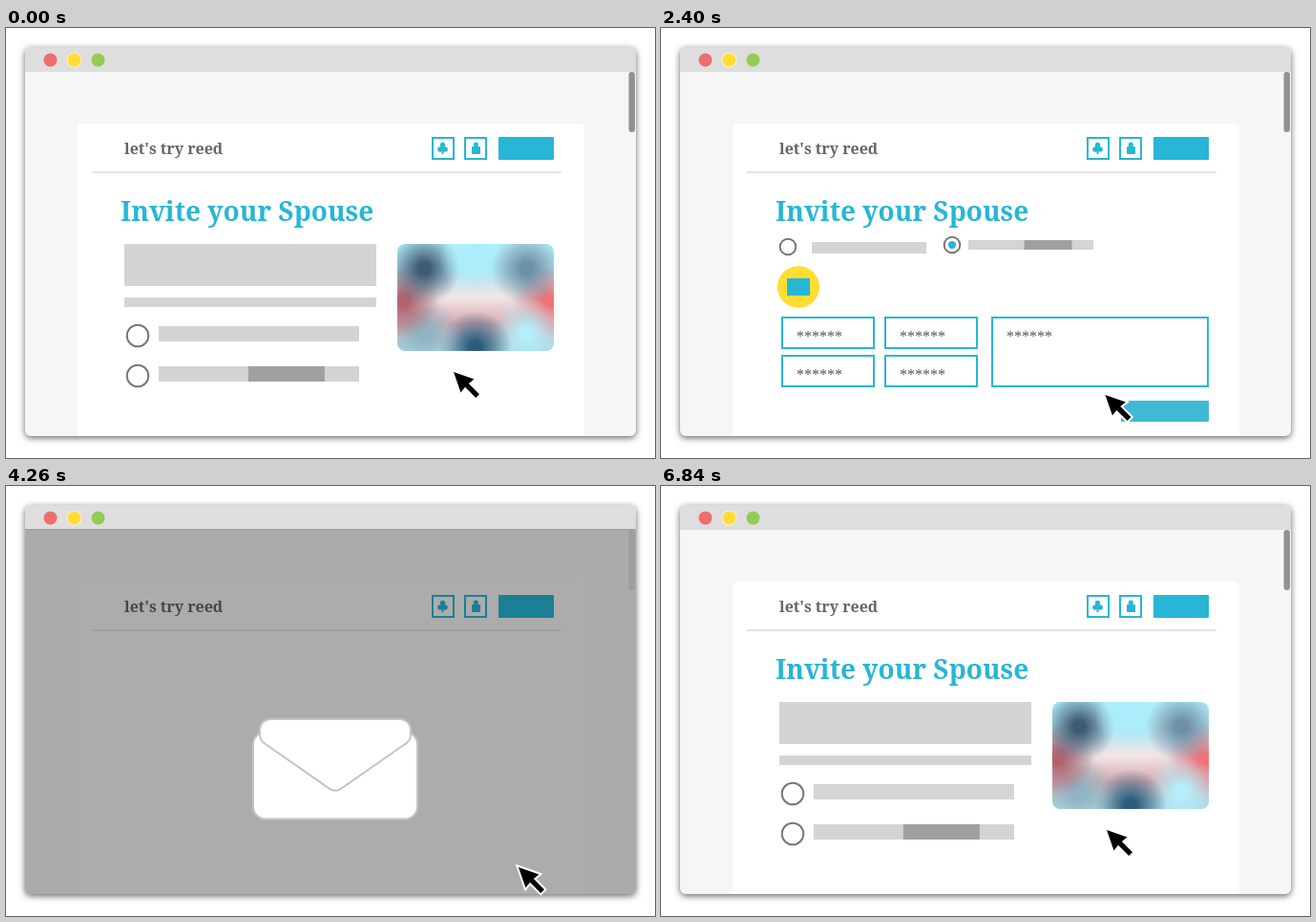
Animation, 680 px wide and 450 px high, one loop 6900 ms. Source, as an HTML page with a canvas:

```html
<!DOCTYPE html>
<html lang="en">
<head>
<meta charset="utf-8">
<title>Invite your Spouse</title>
<style>
html, body { margin: 0; width: 100%; height: 100%; overflow: hidden; background: #fff; }
canvas { display: block; }
</style>
</head>
<body>
<canvas id="stage" width="680" height="450"></canvas>
<script>
const ctx = document.getElementById('stage').getContext('2d');
const LOOP = 6900, TILT = 4.7 * Math.PI / 180;
const BLUE = '#27b6d6', GREY = '#d4d4d4', DARK = '#a0a0a0', EDGE = '#c4c4c4';

const clamp = v => Math.min(1, Math.max(0, v));
const mix = (a, b, k) => a + (b - a) * k;
const mixAll = (a, b, k) => a.map((v, i) => mix(v, b[i], k));
const ease = (t, from, to) => { const k = clamp((t - from) / (to - from)); return k * k * (3 - 2 * k); };

function rect(x, y, w, h, color) {
  ctx.fillStyle = color;
  ctx.fillRect(x, y, w, h);
}
function frame(x, y, w, h, color) {
  ctx.strokeStyle = color;
  ctx.lineWidth = 2;
  ctx.strokeRect(x, y, w, h);
}
function round(x, y, w, h, r, color) {
  ctx.beginPath();
  ctx.roundRect(x, y, w, h, r);
  ctx.fillStyle = color;
  ctx.fill();
}
function disc(x, y, r, color) {
  ctx.beginPath();
  ctx.arc(x, y, r, 0, 7);
  ctx.fillStyle = color;
  ctx.fill();
}
function text(s, x, y, size, color, font = 'bold', family = '"Noto Serif", serif') {
  ctx.font = `${font} ${size}px ${family}`;
  ctx.fillStyle = color;
  ctx.fillText(s, x, y);
}
function group(alpha, draw) {
  if (alpha <= 0) return;
  ctx.save();
  ctx.globalAlpha *= alpha;
  draw();
  ctx.restore();
}
function turned(x, y, angle, draw) {
  ctx.save();
  ctx.translate(x, y);
  ctx.rotate(angle);
  draw();
  ctx.restore();
}
function paper() {
  ctx.fillStyle = '#fff';
  ctx.strokeStyle = EDGE;
  ctx.lineWidth = 2;
  ctx.fill();
  ctx.stroke();
}
function sheet([x, y, w, h], angle) {
  turned(x, y, angle, () => {
    ctx.beginPath();
    ctx.roundRect(-w / 2, -h / 2, w, h, 13);
    paper();
  });
}

function browser(dim) {
  ctx.save();
  ctx.shadowColor = 'rgba(0,0,0,.6)';
  ctx.shadowBlur = 7;
  ctx.shadowOffsetY = 2;
  round(20, 20, 640, 407, 6, '#f6f6f6');
  ctx.restore();
  round(20, 20, 640, 26, [6, 6, 0, 0], '#dedede');
  disc(71.5, 33.5, 8, '#f4f1e4');
  ['#ed6e6e', '#ffdd33', '#93cc52'].forEach((color, i) => disc(46.5 + 25 * i, 33.5, 7, color));
  group(1 - .8 * dim, () => round(75, 100, 531, 327, [5, 5, 0, 0], '#fff'));
  text("let's try reed", 124, 132, 16, '#666');
  rect(90, 150, 492, 2, '#e4e4e4');
  for (const x of [447, 481]) frame(x, 115, 22, 22, BLUE);
  for (let i = 0; i < 3; i++) {
    const a = (i / 3 - .25) * 2 * Math.PI;
    disc(457.5 + 3 * Math.cos(a), 125.5 + 3 * Math.sin(a), 2.7, BLUE);
  }
  rect(456.5, 125, 2, 7, BLUE);
  disc(492.3, 122, 2.6, BLUE);
  round(488, 124, 9, 8, 1, BLUE);
  round(516, 114, 58, 24, 1, BLUE);
}

// Sleeves around a pale table, clockwise from the right
const SLEEVES = ['#ee7478', '#b4eefa', '#2c5c7c', '#8fb4c4', '#b0646e', '#3f5a74', '#aaeefc', '#6e8fa6'];
function photo(x, k) {
  ctx.save();
  ctx.translate(x, 226);
  ctx.filter = `grayscale(${k})`;
  ctx.globalAlpha *= 1 - .8 * k;
  ctx.beginPath();
  ctx.roundRect(0, 0, 164, 112, 8);
  ctx.clip();
  const table = ctx.createLinearGradient(0, 0, 0, 112);
  ['#b4f0fa', '#b4e6f0', '#f2e6e6', '#d8a8ae', '#a8dcea'].forEach((c, i) => table.addColorStop(i / 4, c));
  rect(0, 0, 164, 112, table);
  SLEEVES.forEach((color, i) => {
    const a = i * Math.PI / 4;
    const cx = 82 + 76 * Math.cos(a), cy = 60 + 48 * Math.sin(a);
    const glow = ctx.createRadialGradient(cx, cy, 6, cx, cy, 38);
    glow.addColorStop(0, color);
    glow.addColorStop(1, color + '00');
    rect(0, 0, 164, 112, glow);
  });
  ctx.restore();
}

function radio(x, y, r, checked) {
  disc(x, y, r, '#fff');
  ctx.strokeStyle = '#777';
  ctx.lineWidth = 2;
  ctx.stroke();
  if (checked) disc(x, y, r * .48, BLUE);
}

function invitePage(t, p) {
  text('Invite your Spouse', 120, 202, 28, BLUE);
  group(1 - p, () => {
    rect(124, 226, 264, 44, GREY);
    rect(124, 282, 264, 10, GREY);
  });
  const r = mix(11.3, 8.3, p);
  radio(mix(138, 133, p), mix(322, 229, p), r);
  radio(mix(138, 305, p), mix(364, 227, p), r, t >= 660);
  rect(...mixAll([160, 312, 210, 16], [158, 224, 120, 12], p), GREY);
  photo(mix(410, -228, p), p);
}

function resultPage() {
  rect(126, 192, 222, 200, GREY);
  for (const y of [195, 257]) frame(371, y, 220, 42, '#999');
  for (let y = 314; y < 370; y += 24) rect(370, y, 222, 14, GREY);
}

// Boxes are [centre x, centre y, width, height]
const LETTER = [350, 297, 222, 239];
const cell = (col, row) => [175 + 108 * col, 319 + 40 * row, 96, 32];
const FIELDS = [cell(0, 0), cell(1, 0), cell(0, 1), [460, 339, 226, 72], cell(1, 1)];
const SLOT_WIDTHS = [96, 71, 96, 96, 96, 92];

function onLetter(x, y, w, h) {
  const c = Math.cos(TILT), s = Math.sin(TILT);
  return [LETTER[0] + x * c - y * s, LETTER[1] + x * s + y * c, w, h];
}
// Two columns, aligned left
function slot(i, h) {
  const w = SLOT_WIDTHS[i];
  return onLetter(101 * (i % 2) - 97 + w / 2, 38 * (i >> 1) - 16, w, h);
}
function piece(from, to, k, draw) {
  const [x, y, w, h] = mixAll(from, to, k);
  turned(x, y, TILT * k, () => draw(w, h));
}
function form(t, p, m) {
  group(p, () => {
    piece([144, 271, 44, 44], onLetter(-68, -70.5, 44, 44), m, () => {
      disc(0, 0, 22, '#ffdd33');
      rect(...mixAll([6, 26, 236, 5], [-12, -9, 24, 18], p), BLUE);
    });
    FIELDS.forEach((box, i) => piece(box, slot(i, 32), m, (w, h) => {
      frame(-w / 2, -h / 2, w, h, BLUE);
      const typed = Math.floor(6 * clamp((t - 1560 - i * 130) / 180));
      text('*'.repeat(typed), 15 - w / 2, 25 - h / 2, 16, '#555', '', '"Liberation Serif", serif');
    }));
    piece([528, 401, 92, 22], slot(5, 22), m, (w, h) => {
      rect(-w / 2, -h / 2, w, h, '#c9c9c9');
      group(ease(t, 2100, 2500), () => rect(-w / 2, -h / 2, w, h, BLUE));
    });
  });
  const bar = [387.5, 227, 131, 10];
  piece(mixAll([265, 362, 210, 16], bar, p), bar, m, (w, h) => {
    rect(-w / 2, -h / 2, w, h, GREY);
    rect(-w * .053, -h / 2, w * .381, h, DARK);
  });
}

const FLAP = [[79, -13], [79, 9], [0, 64], [-79, 9], [-79, -13]];
function flap(fold) {
  ctx.save();
  ctx.translate(345, 257);
  ctx.scale(1, fold);
  ctx.beginPath();
  ctx.moveTo(0, -13);
  FLAP.forEach((corner, i) => ctx.arcTo(...corner, ...FLAP[(i + 1) % FLAP.length], 11));
  ctx.closePath();
  ctx.restore();
  paper();
}

function envelope(t) {
  const fly = ease(t, 4320, 4830), shut = ease(t, 3600, 4000);
  const fold = mix(-1, 1, ease(t, 3940, 4180)), size = mix(1, .508, fly);
  ctx.save();
  ctx.translate(mix(345, 498.7, fly), mix(296, -3.8, fly));
  ctx.scale(size, size);
  ctx.translate(-345, -296);
  ctx.globalAlpha *= ease(t, 2940, 3200) * (1 - fly);
  if (shut < 1) {
    const angle = mix(TILT, Math.PI * .265, ease(t, 3000, 3460));
    sheet(mixAll([349, 265, 231, 215], [345, 268, 80, 80], shut), angle);
  }
  if (shut > .5 && fold < 0) flap(fold);
  sheet(mixAll(LETTER, [345, 303, 172, 91], shut), TILT * (1 - shut));
  if (fold >= 0) flap(fold);
  ctx.restore();
}

function cursor(t) {
  let x = 469, y = 360;
  const move = (from, to, tx, ty) => [x, y] = mixAll([x, y], [tx, ty], ease(t, from, to));
  move(60, 600, 136, 367);
  move(1230, 1474, 148, 318);
  move(1900, 2590, 537, 399);
  move(6300, 6800, 467, 360);

  // One side of the arrow, mirrored along its diagonal
  const side = [[21.5, 7.5], [15.8, 12], [27, 23.2]];
  const mirrored = side.map(([a, b]) => [b, a]).reverse();
  ctx.beginPath();
  for (const [dx, dy] of [[0, 0], ...side, ...mirrored]) ctx.lineTo(x + dx, y + dy);
  ctx.closePath();
  ctx.strokeStyle = '#fff';
  ctx.lineWidth = 4;
  ctx.stroke();
  ctx.fillStyle = '#000';
  ctx.fill();
}

function draw(t) {
  const back = ease(t, 6300, 6780);
  const u = t >= 6300 ? 0 : t;
  const p = ease(u, 840, 1620);
  const dim = ease(t, 2940, 3300) - ease(t, 4380, 4900);
  const shown = end => t < 6300 ? 1 - ease(t, end - 300, end) : back;
  rect(0, 0, 680, 450, '#fff');
  browser(dim);
  group(shown(2940), () => invitePage(u, p));
  group(ease(t, 4380, 4700) - back, resultPage);
  group(.305 * dim, () => round(20, 45, 640, 382, [0, 0, 6, 6], '#000'));
  group(1 - .5 * dim, () => round(652.5, 46, 6.5, 63, 3, '#929292'));
  if (t > 2940 && t < 4830) envelope(t);
  group(shown(3620), () => form(u, p, ease(u, 2680, 3300)));
  cursor(t);
}

function tick() {
  draw(performance.now() % LOOP);
  requestAnimationFrame(tick);
}
tick();
</script>
</body>
</html>
```
